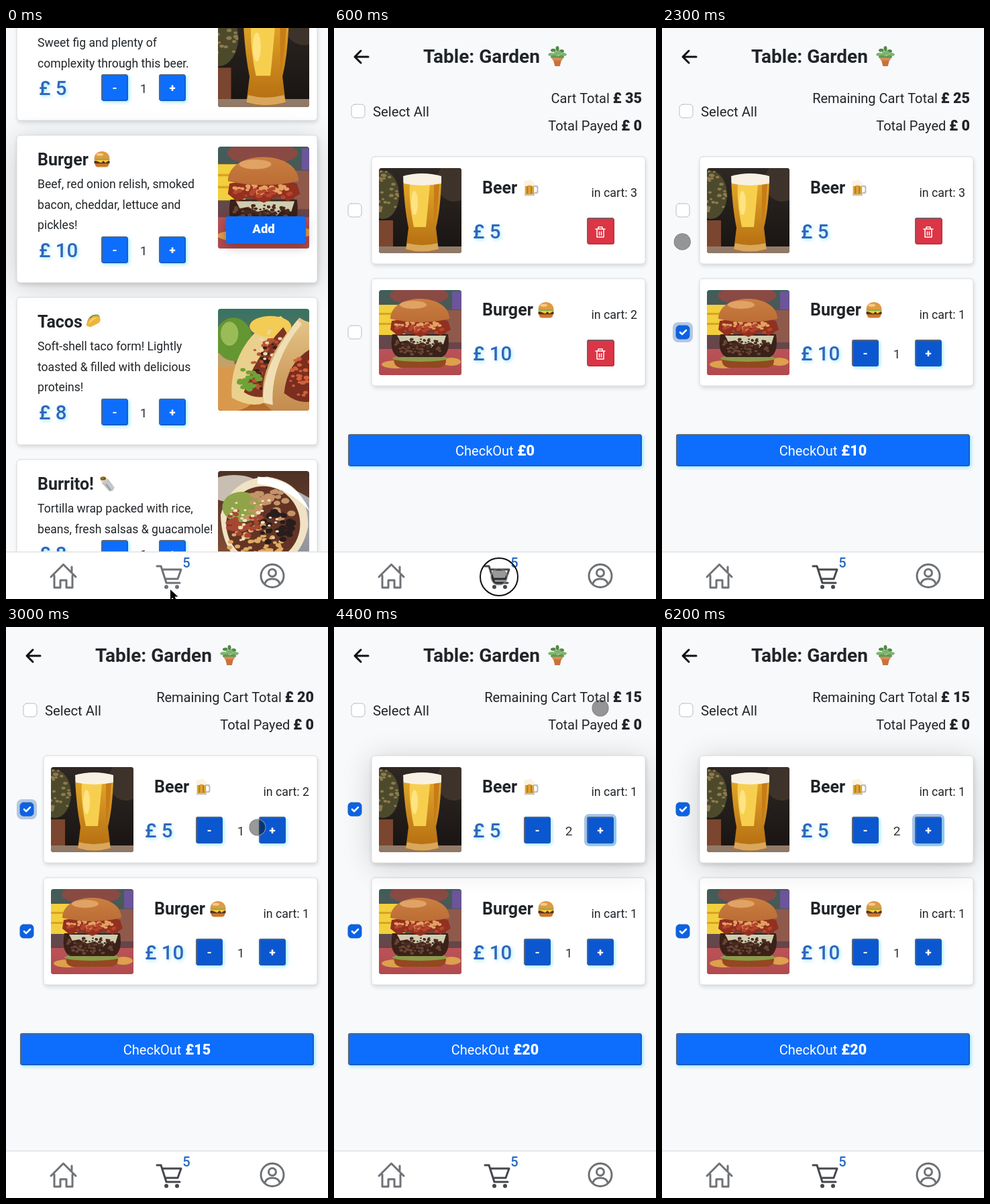
Write an HTML page with a canvas that moves like this. It is 480 by 852 pixels and loops after 6.3 s.

```html
<!DOCTYPE html>
<html lang="en">
<head>
<meta charset="utf-8">
<title>Restaurant cart</title>
<style>
html, body { margin: 0; width: 100%; height: 100%; overflow: hidden; background: #f8f9fb; }
canvas { display: block; }
</style>
</head>
<body>
<canvas id="stage" width="480" height="852"></canvas>
<script>
const ctx = document.getElementById('stage').getContext('2d');
const LOOP = 6300, STEP = 100;
const OPEN_CART = 500, PICK_BURGER = 1900, PICK_BEER = 2500, ADD_BEER = 3400;
const CLICKS = [OPEN_CART, PICK_BURGER, PICK_BEER, ADD_BEER];
const INK = '#212529', BLUE = '#0d6efd', DARK_BLUE = '#0b57d0', GREY = '#6f7276';

// time, x, y
const CURSOR = [
  [0, 245, 838], [200, 246, 819], [800, 246, 819], [1400, 246, 824], [1700, 32, 452],
  [2100, 31, 453], [2400, 30, 272], [2700, 31, 272], [3000, 375, 299], [3200, 394, 302],
  [3600, 396, 302], [4200, 397, 118], [4400, 397, 121], [4900, 256, 626], [5400, 244, 645],
  [5700, 244, 872]
];

const oval = (x, y, rx, ry = rx) =>
  `M${x - rx} ${y}a${rx} ${ry} 0 1 0 ${2 * rx} 0a${rx} ${ry} 0 1 0 ${-2 * rx} 0z`;
const rect = (x, y, w, h) => `M${x} ${y}h${w}v${h}h${-w}z`;

// Emoji on a 24 x 24 grid
const EMOJI = {
  burger: [
    ['#c9792b', 'M2 17h20q0 6-4 6H6q-4 0-4-6z'], ['#5d2f1c', rect(1, 14, 22, 4)],
    ['#f9c93a', 'M1 13h22l-6 4-3-3-3 3z'], ['#86b046', rect(1, 11, 22, 2)],
    ['#e09a44', 'M1 11C1-3 23-3 23 11z'], ['#f8cd85', oval(9, 5, 5, 2)]
  ],
  taco: [
    ['#6fa33a', 'M3 14Q6 1 18 2q5 2 3 8L8 20z'], ['#b3392b', oval(11, 7, 4, 2)],
    ['#8a4a25', oval(7, 12, 3, 2)], ['#f0b43c', 'M2 17C5 5 14 3 19 4c5 3 4 9-1 11-6 3-12 7-16 2z'],
    ['#ffd36b', 'M5 16C8 8 13 6 18 6c-5 3-9 6-13 10z']
  ],
  burrito: [
    ['#eed9ae', 'M2 5Q6-1 11 3l9 11-8 6L3 9z'], ['#8a4a25', oval(6, 4.5, 4, 2.5)],
    ['#6fa33a', oval(5, 4, 2, 1)], ['#c3c6ca', 'M4 11l9-6 9 12q0 6-7 6z'], ['#979ca3', 'M9 13l7 9 2-1-7-9z']
  ],
  plant: [
    ['#6b7f4a', 'M11.500 15V3h1v12z'], ['#4f8a48', oval(7, 5, 3, 2) + oval(17, 6, 3, 2) + oval(12, 3, 2, 3)],
    ['#7fb36d', oval(5, 10, 4, 2) + oval(19, 10, 4, 2) + oval(10, 9, 2, 3) + oval(14, 8, 2, 3)],
    ['#5b9a52', oval(8, 13, 4, 2) + oval(16, 13, 4, 2)],
    ['#c9713d', 'M7 16h10l-2 8H9z'], ['#dd8a52', rect(6, 14, 12, 3)]
  ],
  beer: [
    ['#b9bec5', 'M16 8h4q3 0 3 3v6q0 3-3 3h-4v-2h3q2 0 2-2v-4q0-2-2-2h-3z'],
    ['#dca437', rect(4, 6, 13, 16)], ['#b87920', 'M6.500 9h2v11h-2zM12 9h2v11h-2z'],
    ['#faf3e2', oval(6, 5, 4) + oval(11, 4, 4) + oval(15, 6, 3)], ['#c7cbd0', rect(3, 21, 15, 2)]
  ]
};

// Photos on a 123 x 127 grid; "a>b" is a vertical gradient,
// a numeric third entry scatters that many crumbs in the oval given after it
const PHOTO = {
  beer: [
    ['#2f2824>#181412', rect(-9, 0, 141, 127)], ['#3d332b', oval(112, 20, 26, 30)],
    ['#4d4a2c', oval(6, 40, 24, 36)], ['#8d7a4e', '', 38, 7, 36, 22, 38, 3],
    ['#7a4630', rect(-9, 78, 30, 40)], ['#c9b3a0>#8f7765', rect(-9, 117, 141, 10)],
    ['#eab02c>#b26a10', 'M36 17Q38 60 44 89L40 122Q64 128 89 122L85 89Q92 60 93 17z'],
    ['#f7cf4f', 'M46 24h30q-3 34-6 64H52Q44 50 46 24z'], ['#ffe383', oval(53, 52, 5, 18)],
    ['#c87c18', 'M82 24h8q-2 38-8 62z'],
    ['#d9a75c', 'M42 112Q64 118 87 112l2 9Q64 128 40 121z'],
    ['#f8f1e3', 'M36 12Q64 4 93 12v11Q64 29 37 23z']
  ],
  burger: [
    ['#3f5f5a>#7d3840', rect(-9, 0, 141, 127)], ['#8a4a44', oval(60, 8, 44, 14)],
    ['#6c559a', rect(109, 2, 22, 27)], ['#8f5a4c', rect(100, 30, 32, 48)],
    ['#f2cf3d', rect(-9, 22, 48, 45)], ['#d9a324', 'M-9 34h45v3H-9zM-9 49h45v3H-9z'],
    ['#d0686c>#b04a4e', rect(-9, 88, 141, 39)], ['#dda04c', oval(25, 111, 21, 6) + oval(108, 107, 14, 6)],
    ['#93481f', 'M23 100h76q4 13-9 16H32q-12-3-9-16z'], ['#8c9a4a', oval(61, 102, 41, 5)],
    ['#3a2119', 'M20 66h83q4 28-9 34H29q-14-6-9-34z'], ['#6b4634', '', 75, 61, 82, 38, 15, 2.5],
    ['#d0cdb0', 'M27 68h73l-4 13-10-4-8 9-12-8-15 4-8-7-11 2z'], ['#4a2a1f', '', 34, 62, 80, 33, 8, 2.500],
    ['#93301f', 'M19 46q40-7 84 0l4 13-15 9-13-6-17 8-19-7-15 5-11-9z'],
    ['#e3a263', '', 30, 61, 54, 38, 7, 3.500], ['#b5452f', '', 24, 61, 58, 40, 7, 3],
    ['#d08545>#98451a', 'M17 43C17 3 105 3 105 43Q62 53 17 43z'], ['#e0a365', oval(51, 22, 20, 6)]
  ],
  taco: [
    ['#357365>#bc6b27', rect(-9, 0, 141, 127)], ['#d9994d', oval(20, 98, 36, 30)],
    ['#c2a16b', rect(-9, 55, 34, 17)], ['#649632', oval(24, 38, 23, 27)], ['#9abc57', oval(19, 31, 11, 15)],
    ['#ead08d', 'M22 111C18 68 43 23 83 9q21 18 10 75-25 53-71 27z'],
    ['#f2cc55', oval(70, 22, 26, 13)], ['#7f3422', 'M37 104Q48 63 86 23q18 25 4 71-28 26-53 10z'],
    ['#ba5331', '', 60, 68, 71, 22, 34, 3], ['#381f19', '', 32, 70, 75, 21, 32, 3],
    ['#eed8b1', '', 22, 73, 54, 17, 28, 2.500], ['#6fa236', '', 24, 45, 88, 16, 15, 4],
    ['#e8cb8e>#c48b4e', 'M61 117C55 74 83 38 106 11q16 10 26 4v112H72z'],
    ['#7b2e1e', 'M87 105Q91 67 120 50h12v59q-20 16-45-4z'], ['#d4603a', '', 32, 112, 84, 18, 25, 3],
    ['#f0dfb4', 'M61 117C58 75 89 33 104 14l5 5C91 41 70 77 73 120z']
  ],
  burrito: [
    ['#4d3025>#8c5535', rect(-9, 0, 141, 127)], ['#c8beb1', oval(25, 22, 35, 17)],
    ['#b9bcc0>#868990', 'M72 8l60 33v86H54z'], ['#f0e2c4', 'M8 55Q19 10 66 7q51 8 51 62-10 51-62 54Q10 113 8 55z'],
    ['#633425', oval(61, 66, 46, 47)], ['#8fa449', oval(34, 45, 24, 19)],
    ['#dfac62', '', 75, 49, 88, 37, 24, 3], ['#c49468', '', 36, 68, 46, 32, 22, 5],
    ['#a84633', '', 35, 39, 64, 25, 17, 4], ['#291d1d', '', 28, 80, 73, 22, 23, 5],
    ['#f1dfba', '', 28, 50, 61, 34, 34, 2.5], ['#ffffff', 'M54 7Q102 9 119 50q-28-31-65-34z']
  ]
};

const MENU = [
  { name: 'Beer', art: 'beer', top: -51, price: 5, lines: ['Sweet fig and plenty of', 'complexity through this beer.'] },
  { name: 'Burger', art: 'burger', top: 160, price: 10, emoji: 143, lines: ['Beef, red onion relish, smoked', 'bacon, cheddar, lettuce and', 'pickles!'] },
  { name: 'Tacos', art: 'taco', top: 402, price: 8, emoji: 130, lines: ['Soft-shell taco form! Lightly', 'toasted & filled with delicious', 'proteins!'] },
  { name: 'Burrito!', art: 'burrito', top: 644, price: 8, emoji: 151, lines: ['Tortilla wrap packed with rice,', 'beans, fresh salsas & guacamole!'] }
];

function fill(color, path) {
  const [a, b] = color.split('>');
  if (b) {
    const g = ctx.createLinearGradient(0, 0, 0, 127);
    g.addColorStop(0, a);
    g.addColorStop(1, b);
    ctx.fillStyle = g;
  } else ctx.fillStyle = a;
  ctx.fill(new Path2D(path));
}

function line(color, width, path) {
  ctx.strokeStyle = color;
  ctx.lineWidth = width;
  ctx.lineCap = ctx.lineJoin = 'round';
  ctx.stroke(new Path2D(path));
}

function round(x, y, w, h, r, color, border) {
  ctx.beginPath();
  ctx.roundRect(x, y, w, h, r);
  ctx.fillStyle = color;
  ctx.fill();
  if (border) {
    ctx.shadowColor = 'transparent';
    ctx.strokeStyle = border;
    ctx.lineWidth = 1;
    ctx.stroke();
  }
}

function shadowed(color, blur, dx, dy, draw) {
  ctx.save();
  Object.assign(ctx, { shadowColor: color, shadowBlur: blur, shadowOffsetX: dx, shadowOffsetY: dy });
  draw();
  ctx.restore();
}
const halo = draw => shadowed('rgba(70,215,255,.5)', 5, 2, 2, draw);

function text(str, x, y, size, { weight = 400, color = INK, align = 'left' } = {}) {
  ctx.font = `${weight} ${size}px Roboto, sans-serif`;
  ctx.textAlign = align;
  ctx.fillStyle = color;
  ctx.fillText(str, x, y);
  return ctx.measureText(str).width;
}

function crumbs(color, count, cx, cy, rx, ry, size) {
  let seed = count * 131 + cx;
  const random = () => (seed = (seed * 16807) % 2147483647) / 2147483647;
  random();
  for (let i = 0; i < count; i++) {
    const a = random() * 6.283, d = Math.sqrt(random()), s = size * (0.6 + random() * 0.6);
    fill(color, oval(cx + rx * d * Math.cos(a), cy + ry * d * Math.sin(a), s, s * 0.7));
  }
}

function photo(name, x, y, w, h) {
  ctx.save();
  ctx.beginPath();
  ctx.roundRect(x, y, w, h, 4);
  ctx.clip();
  const s = h / 127;
  ctx.translate(x + w / 2 - 61.5 * s, y);
  ctx.scale(s, s);
  for (const [color, path, count, ...area] of PHOTO[name])
    count ? crumbs(color, count, ...area) : fill(color, path);
  ctx.restore();
}

function emoji(name, cx, cy, size = 25) {
  ctx.save();
  ctx.translate(cx - size / 2, cy - size / 2);
  ctx.scale(size / 24, size / 24);
  EMOJI[name].forEach(part => fill(...part));
  ctx.restore();
}

function card(x, y, w, h, lift = 0) {
  if (lift) shadowed(`rgba(0,0,0,${0.18 * lift})`, 44, 0, 5, () => round(x, y, w, h, 5, '#fff'));
  shadowed('rgba(0,0,0,.14)', 6, 1, 3, () => round(x, y, w, h, 5, '#fff', '#d9dbde'));
}

// Raised edge: grey on the top and left, darker on the bottom and right
function bevel(x, y, w, h, light, dark) {
  line(dark, 1.5, `M${x + 3} ${y + h - 1}H${x + w - 3}q2 0 2-2V${y + 3}`);
  line(light, 2, `M${x + 1} ${y + h - 3}V${y + 3}q0-2 2-2H${x + w - 3}`);
}

function button(x, y, w, h, color) {
  halo(() => round(x, y, w, h, 4, color));
  bevel(x, y, w, h, '#56647c', '#1d58b4');
}

function stepper(minusX, countX, plusX, y, count, color, focused) {
  if (focused) round(plusX - 4, y - 4, 48, 48, 7, '#a9c3ea');
  for (const [x, sign] of [[minusX, '-'], [plusX, '+']]) {
    button(x, y, 40, 40, color);
    text(sign, x + 20, y + 26, 17, { weight: 900, color: '#fff', align: 'center' });
  }
  text(count, countX, y + 28, 19, { color: '#333', align: 'center' });
}

const price = (value, x, y) =>
  halo(() => text('£ ' + value, x, y, 29.5, { weight: 500, color: '#2f67bd' }));

function menuPage() {
  for (const { name, art, top, price: cost, emoji: emojiX, lines } of MENU) {
    const cut = (3 - lines.length) * 31, hovered = art === 'burger';
    card(16, top, 448, 220 - cut, hovered ? 1 : 0);
    text(name, 47, top + 45, 25, { weight: 600 });
    if (emojiX) emoji(art, emojiX, top + 36);
    lines.forEach((s, i) => text(s, 47, top + 79 + i * 30.7, 17.6));
    price(cost, 49, top + 182 - cut);
    stepper(142, 205, 228, top + 151 - cut, 1, BLUE);
    photo(art, 316, top + 17, 136, 152);
    if (hovered) {
      shadowed('rgba(0,0,0,.3)', 16, 0, 4, () => round(328, 281, 119, 41, 4, BLUE));
      text('Add', 384, 306, 18.5, { weight: 900, color: '#fff', align: 'center' });
    }
  }
}

function checkbox(cx, cy, size, checked, focused) {
  const h = size / 2;
  if (focused) round(cx - h - 5, cy - h - 5, size + 10, size + 10, 8, '#b3c8e3');
  round(cx - h, cy - h, size, size, 5, checked ? '#0b62e4' : '#fff', checked ? '#2361b8' : '#b9bcc0');
  if (checked) line('#fff', 2.5, `M${cx - 4} ${cy}l3 3 6-6`);
}

function total(label, value, y) {
  const w = text('£ ' + value, 459, y, 21.5, { weight: 900, align: 'right' });
  text(label, 459 - w - 5, y, 20, { align: 'right' });
}

function cartRow(item, y, row) {
  card(56, y, 408, 160, row.lift);
  photo(item.art, 67, y + 17, 123, 127);
  text(item.name, 221, y + 55, 25, { weight: 600 });
  emoji(item.art, row.emojiX, y + 47);
  text('in cart: ' + row.left, 452, y + 60, 17.8, { align: 'right' });
  price(item.price, 207, y + 122);
  checkbox(31, y + 80, 20, row.checked, row.focused);
  if (row.checked) stepper(283, 350, 377, y + 91, row.count, DARK_BLUE, row.plusFocused);
  else {
    round(377, y + 91, 41, 40, 4, '#dc3545');
    bevel(377, y + 91, 41, 40, '#7d5960', '#a83a46');
    line('#fff', 1.5, `M390 ${y + 108}h14M394 ${y + 108}v-3h6v3M392 ${y + 108}v12h10v-12M395.500 ${y + 112}v5M398.500 ${y + 112}v5`);
  }
}

function cartPage(t) {
  const burger = t >= PICK_BURGER, beer = t >= PICK_BEER, extra = t >= ADD_BEER;
  const due = burger * 10 + beer * 5 + extra * 5, beers = beer + extra;
  line('#111', 3, 'M51 43H32M40 34l-9 9 9 9');
  text('Table: Garden', 133, 52, 28, { weight: 600 });
  emoji('plant', 333, 42, 30);
  checkbox(36, 124, 20);
  text('Select All', 58, 132, 20.3);
  total(due ? 'Remaining Cart Total' : 'Cart Total', 35 - due, 112);
  total('Total Payed', 0, 153);
  cartRow(MENU[1], 374, { emojiX: 316, left: 2 - burger, count: 1, checked: burger, focused: burger && !beer });
  cartRow(MENU[0], 192, {
    emojiX: 293, left: 3 - beers, count: beers, checked: beer, focused: beer && !extra,
    lift: extra ? Math.min(1, (t - ADD_BEER + STEP) / 300) : 0, plusFocused: extra
  });

  button(21, 606, 438, 48, BLUE);
  line('#56647c', 3, 'M22.500 609v42');
  ctx.font = '400 20px Roboto, sans-serif';
  const labelWidth = ctx.measureText('CheckOut').width + 6;
  ctx.font = '900 21.5px Roboto, sans-serif';
  const x = 240 - (labelWidth + ctx.measureText('£' + due).width) / 2;
  text('CheckOut', x, 638, 20, { color: '#fff' });
  text('£' + due, x + labelWidth, 638, 21.5, { weight: 900, color: '#fff' });
}

function navBar(cartActive) {
  fill('#fff', rect(0, 782, 480, 70));
  fill('#dfe2e5', rect(0, 781, 480, 1.5));
  line(GREY, 3, 'M67 819l18.500-18.500L104 819M72 817v18h9v-11h9v11h9v-18M98 811v-7');
  const color = cartActive ? '#45484c' : GREY;
  line(color, 3, 'M225 803h6l8 25h20M233 808h28l-5 14h-18');
  fill(color, oval(239, 834, 3) + oval(255, 834, 3));
  line(GREY, 3, oval(397, 817.5, 17) + oval(397, 813, 5.5) + 'M386 829q2-7 11-7t11 7');
  text('5', 269, 805, 20, { weight: 500, color: '#2468c4', align: 'center' });
}

function cursorAt(t) {
  const i = CURSOR.findIndex(k => k[0] > t);
  if (i < 0) return CURSOR[CURSOR.length - 1].slice(1);
  const [t0, x0, y0] = CURSOR[i - 1], [t1, x1, y1] = CURSOR[i];
  const p = (t - t0) / (t1 - t0), e = p * p * (3 - 2 * p);
  return [x0 + (x1 - x0) * e, y0 + (y1 - y0) * e];
}

function cursor(t) {
  const [x, y] = cursorAt(t);
  if (t < STEP) {
    const arrow = `M${x} ${y}v15l3.500-3 3 6 3-1.500-3-6h5z`;
    line('#fff', 2, arrow);
    fill('#000', arrow);
    return;
  }
  fill('rgba(0,0,0,.4)', oval(x, y, 12));
  line('#85878a', 1.2, oval(x, y, 12));
  // The ring shows while the button is held down
  if (CLICKS.some(c => Math.abs(t - c) <= STEP)) line('#111', 2, oval(x, y, 28));
}

function frame(now) {
  const t = Math.floor((now % LOOP) / STEP) * STEP, inCart = t >= OPEN_CART;
  fill('#f8f9fb', rect(0, 0, 480, 852));
  inCart ? cartPage(t) : menuPage();
  navBar(inCart);
  cursor(t);
  requestAnimationFrame(tick);
}

const start = performance.now();
const tick = () => frame(performance.now() - start);
tick();
</script>
</body>
</html>
```
